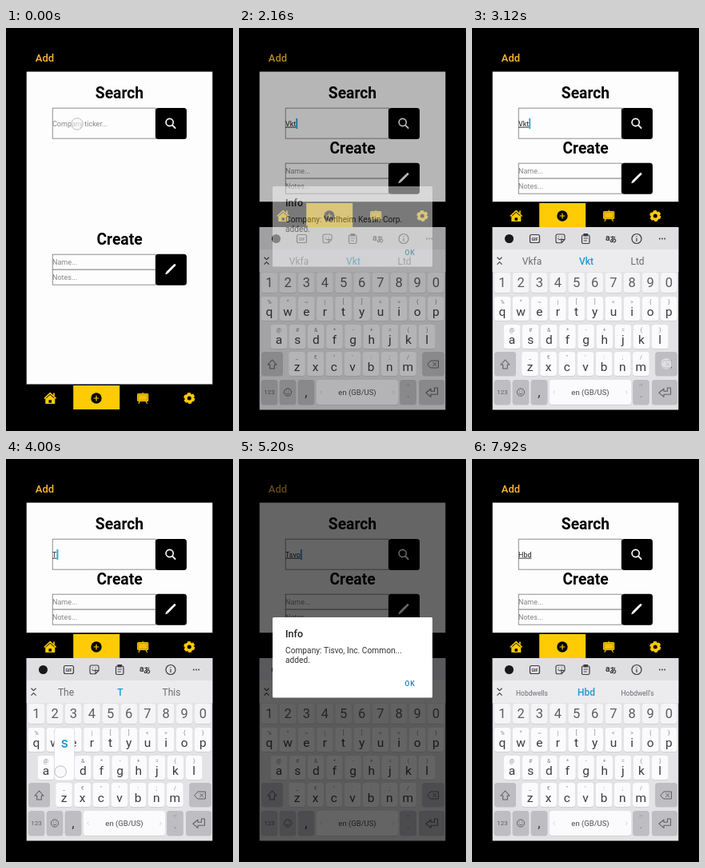
Recreate the animation shown at these times as an HTML page. Size 284x504 px, loop 8000 ms.

```html
<!DOCTYPE html>
<html lang="en">
<head>
<meta charset="utf-8">
<title>Add a company</title>
<style>
html, body { margin: 0; width: 100%; height: 100%; overflow: hidden; background: #000; }
svg { display: block; width: 284px; height: 504px; font-family: Roboto, sans-serif; }
text { white-space: pre; }
</style>
</head>
<body>
<svg id="stage" viewBox="0 0 284 504"></svg>
<script>
const LOOP = 8000;
const YELLOW = '#ffcb05', BLUE = '#1c9ad2', INK = '#3a3c40';

function el(parent, tag, attrs = {}, text) {
  const node = document.createElementNS('http://www.w3.org/2000/svg', tag);
  for (const k in attrs) node.setAttribute(k, attrs[k]);
  if (text !== undefined) node.textContent = text;
  parent.appendChild(node);
  return node;
}
const group = (parent, attrs) => el(parent, 'g', attrs);
const rect = (parent, x, y, width, height, fill, attrs) =>
  el(parent, 'rect', { x, y, width, height, fill, ...attrs });
const label = (parent, x, y, size, fill, text, attrs) =>
  el(parent, 'text', { x, y, 'font-size': size, fill, ...attrs }, text);
const centered = (parent, x, y, size, fill, text, attrs) =>
  label(parent, x, y, size, fill, text, { 'text-anchor': 'middle', ...attrs });
const line = (parent, d, stroke, width = 1, attrs) =>
  el(parent, 'path', { d, stroke, fill: 'none', 'stroke-width': width, 'stroke-linecap': 'round', 'stroke-linejoin': 'round', ...attrs });
const circle = (parent, cx, cy, r, fill, attrs) => el(parent, 'circle', { cx, cy, r, fill, ...attrs });
const show = (node, on) => node.setAttribute('visibility', on ? 'visible' : 'hidden');
const shift = (node, y) => node.setAttribute('transform', `translate(0 ${y})`);
const ramp = (t, from, to) => Math.min(1, Math.max(0, (t - from) / (to - from)));

const stage = document.getElementById('stage');
rect(stage, 0, 0, 284, 504, '#000');
rect(el(stage, 'clipPath', { id: 'screen' }), 25.7, 32, 232.6, 445.6, '#000');
const screen = group(stage, { 'clip-path': 'url(#screen)' });

// Page
label(screen, 36.8, 41.7, 13, '#fdb92e', 'Add', { 'font-weight': 500 });
const page = rect(screen, 25, 54.6, 234, 391.6, '#fdfdfd');

function field(parent, y, h, hint) {
  rect(parent, 58.3, y + .2, 129, h, '#fdfdfd', { stroke: '#8f8f8f' });
  return label(parent, 58, y + h / 2 + 3.6, 9, '#858585', hint);
}
function button(parent, y) {
  rect(parent, 187, y, 39, 39, '#000', { rx: 3.5 });
}
const bold = { 'font-weight': 700 };
centered(screen, 142, 88.2, 19.3, '#000', 'Search', bold);
const hint = field(screen, 100, 38, 'Company ticker...');
button(screen, 100);
circle(screen, 204.7, 118, 4.6, 'none', { stroke: '#fff', 'stroke-width': 1.6 });
line(screen, 'M208.2 121.6L211.6 125', '#fff', 1.8);
const typed = label(screen, 58, 122.7, 9, '#222', '', { 'text-decoration': 'underline' });
const caret = rect(screen, 58, 113, 2, 13, '#35a9d6');

const create = group(screen);
centered(create, 142, 271, 19.3, '#000', 'Create', bold);
field(create, 283, 19, 'Name...');
field(create, 302, 19, 'Notes...');
button(create, 282.7);
line(create, 'M201.5 306L209.4 298.1', '#fff', 2.8, { 'stroke-linecap': 'butt' });
line(create, 'M210.1 297.4L211 296.5', '#fff', 2.8);
el(create, 'path', { d: 'M200.3 305L202.6 307.3L199.3 308.3Z', fill: '#fff' });

// Tab bar
const nav = group(screen);
rect(nav, 25, -1.5, 234, 32, '#000');
rect(nav, 84.2, 0, 58, 30, YELLOW);
line(nav, 'M50 16.2V22.4H60.6V16.2', YELLOW, 1.4);
el(nav, 'path', { d: 'M50 16.5V22.5H53.5V18.3H57V22.5H60.5V16.5L55.2 11.8Z', fill: YELLOW });
line(nav, 'M48.3 16L55.2 9.6L62.2 16M60 10V13', YELLOW, 1.6);
circle(nav, 113, 16, 6.7, '#000');
line(nav, 'M113 13V19M110 16H116', YELLOW, 1.2);
rect(nav, 164.6, 10.6, 13.2, 9, '#c99f05', { stroke: YELLOW, rx: .6 });
rect(nav, 166.3, 12.2, 9.8, 5.8, '#f2c005');
line(nav, 'M171.2 9V10M167.3 20L166 22.6M175.1 20L176.4 22.6', YELLOW, 1.1);
circle(nav, 229.3, 16, 5.6, 'none', { stroke: YELLOW, 'stroke-width': 3, 'stroke-dasharray': '3.6 2.264' });
circle(nav, 229.3, 16, 4.2, 'none', { stroke: YELLOW, 'stroke-width': 3.4 });

// Keyboard
const board = group(screen);
rect(board, 25, 249, 234, 230, '#e3e2e5');
rect(board, 25, 249, 234, 28, '#dfdee1');
rect(board, 25, 277, 234, 28, '#ecebee');
circle(board, 46.5, 263.5, 5.5, '#16181b');
const tools = group(board, { fill: 'none', stroke: INK, 'stroke-width': 1.2, 'stroke-linecap': 'round', 'stroke-linejoin': 'round' });
rect(tools, 72.5, 258.5, 12, 10, 'none', { rx: 2 });
centered(board, 78.5, 265.7, 5.2, INK, 'GIF', bold);
line(tools, 'M107 258H114Q116 258 116 260V264.5L112 268.7H107Q105 268.7 105 266.7V260Q105 258 107 258ZM116 264.5H112V268.7M107.8 263.5Q110 266 112.2 263.5M108.3 261V261.1M112.3 261V261.1', INK, 1.1);
rect(tools, 137.5, 259, 9.5, 10.5, 'none', { rx: 1.5 });
rect(tools, 140, 257.5, 4.5, 2.5, INK);
line(tools, 'M140 263H144.5M140 266H143.5', INK, .9);
label(board, 167, 266, 10.5, INK, 'a', { 'font-weight': 700 });
label(board, 172, 268, 9, INK, 'あ', { 'font-family': '"Noto Sans CJK JP", "Noto Sans CJK", sans-serif', 'font-weight': 700 });
circle(tools, 206, 263.5, 6, 'none');
line(tools, 'M206 263V266.5M206 260.6V260.7', INK, 1.2);
for (const x of [234.8, 238, 241.2]) circle(board, x, 263.5, .9, INK);
line(board, 'M31.8 287L34.5 289.6L37.2 287M31.8 295.3L34.5 292.7L37.2 295.3', INK, 1.1);

const words = [75, 143, 207].map((x, i) =>
  centered(board, x, 295.5, 12, i === 1 ? BLUE : '#6b6d71', '', i === 1 ? { 'font-weight': 500 } : {}));

function keycap(x, y, w, h, fill = '#fbfafd') {
  rect(board, x - w / 2, y + .8, w, h, '#cbcace', { rx: 3.5 });
  rect(board, x - w / 2, y, w, h, fill, { rx: 3.5 });
}
const GREY = '#bebdc1', ICON = '#606166';
const keys = {};
[...'1234567890'].forEach((c, i) => {
  const x = 38 + i * 23.15;
  keycap(x, 306, 20.6, 25, '#f5f4f7');
  centered(board, x, 324.2, 16.5, '#5b5d61', c);
});
const rows = [
  ['qwertyuiop', '%^~|[]<>{}', 38, 336],
  ['asdfghjkl', '@#&*-+=()', 50, 371],
  ['zxcvbnm', '_€"\':;/', 72.5, 405]
];
for (const [letters, marks, x0, y] of rows) {
  [...letters].forEach((c, i) => {
    const x = x0 + i * 23.15;
    keycap(x, y, 20.6, 30);
    centered(board, x, y + 8.5, 7, '#85878b', marks[i]);
    keys[c] = { x, y, cap: centered(board, x, y + 23.6, 15.5, INK, c) };
  });
}
keycap(41.5, 405, 27, 30, GREY);
const shiftIcon = line(board, 'M41.5 415L47 421H44.3V426H38.7V421H36Z', ICON, 1.1);
keycap(243, 405, 27.5, 30, GREY);
line(board, 'M236 420.5L240 416H249.5V425H240ZM242.8 418.5L246.8 422.5M246.8 418.5L242.8 422.5', ICON, 1);
keycap(38, 440, 20.6, 31, GREY);
centered(board, 38, 458.3, 8, ICON, '123');
keycap(61, 440, 20.6, 31, GREY);
circle(board, 61, 455.5, 4.6, 'none', { stroke: ICON });
line(board, 'M58.8 456.8Q61 459.2 63.2 456.8M59.4 453.8V454M62.6 453.8V454', ICON, .9);
keycap(84, 440, 20.6, 31, GREY);
centered(board, 84, 461, 17, INK, ',');
keycap(148, 440, 102, 31);
centered(board, 148, 458.7, 9.5, '#4b4d51', 'en (GB/US)');
line(board, 'M103.5 453.7L101.7 455.5L103.5 457.3M192.5 453.7L194.3 455.5L192.5 457.3', '#d2d3d6', 1);
keycap(211.5, 440, 20.6, 31, GREY);
centered(board, 211.5, 448.5, 6, '#96979b', '!?');
centered(board, 211.5, 462, 14, '#808186', '.');
keycap(241, 440, 32, 31, GREY);
line(board, 'M248.5 450V458.2H240V461.3L233.8 456.2L240 451.2V454.2H244.5V450Z', ICON, 1.1);

const popup = group(screen);
const popupBox = rect(popup, 0, 0, 25, 66, '#fdfdfe', { rx: 4, stroke: '#d3d2d6', 'stroke-width': .6 });
const popupText = centered(popup, 0, 0, 17.5, BLUE, '', { 'font-weight': 500 });

// Dialog
const dim = rect(stage, 0, 0, 284, 504, '#000');
const dialog = group(stage);
rect(dialog, 42, 198, 200, 100.5, '#fff', { rx: 1.5 });
label(dialog, 58, 222.7, 12.5, '#222', 'Info', { 'font-weight': 500 });
const message = label(dialog, 58, 243, 10.2, '#333', '');
label(dialog, 58, 255, 10.2, '#333', 'added.');
label(dialog, 207.5, 284, 8.6, '#1a7fae', 'OK', { 'font-weight': 500, 'letter-spacing': .7 });

const touch = circle(stage, 0, 0, 7.3, '#f6f6fa', { 'fill-opacity': .6, stroke: '#bdbcc6', 'stroke-width': 1 });

// Script of taps: time, target
const spots = { field: [89, 120], go: [206, 120], ok: [221, 282], del: [243, 420] };
const taps = [
  [-40, 'field'],
  [660, 'v'], [840, 'k'], [1020, 't'], [1420, 'go'], [2480, 'ok'],
  [3080, 'del'], [3280, 'del'], [3500, 'del'],
  [3760, 't'], [3980, 's'], [4160, 'v'], [4330, 'o'], [4560, 'go'], [5440, 'ok'],
  [6480, 'del'], [6600, 'del'], [6720, 'del'], [6840, 'del'],
  [6990, 'h'], [7160, 'b'], [7330, 'd']
];
const dialogs = [
  [2090, 2560, 'Company: Vorlheim Kestin Corp.'],
  [4880, 5640, 'Company: Tisvo, Inc. Common...']
];
const guesses = {
  '': ['I', 'The', 'This'],
  V: ['Very', 'V', 'Via'], Vk: ['Vkf', 'Vk', 'Ok'], Vkt: ['Vkfa', 'Vkt', 'Ltd'],
  T: ['The', 'T', 'This'], Ts: ['Tsk', 'Ts', 'Its'], Tsv: ['Tsv', 'Tsvo', 'Tai'], Tsvo: ['Tsvo', 'Tisvo', 'Tällä'],
  H: ['Hi', 'H', 'How'], Hb: ['Hb', 'Hub', 'He'], Hbd: ['Hobdwells', 'Hbd', "Hobdwell's"]
};
const PRESS = 85;

function textAt(t) {
  let text = '', edited = 0;
  for (const [at, key] of taps) {
    if (t < at + PRESS) break;
    if (key === 'del') text = text.slice(0, -1);
    else if (keys[key]) text += text ? key : key.toUpperCase();
    edited = at + PRESS;
  }
  return { text, edited };
}

function drawTouch(t, caps) {
  show(touch, false);
  show(popup, false);
  for (const [at, name] of taps) {
    const life = name === 'ok' ? 240 : 180, age = t - at;
    if (age < 0 || age >= life) continue;
    const key = keys[name];
    const [x, y] = key ? [key.x - (name === 's' ? 5 : 0), key.y + 20] : spots[name];
    show(touch, true);
    touch.setAttribute('cx', x);
    touch.setAttribute('cy', y);
    touch.setAttribute('opacity', 1 - .6 * ramp(age, life * .5, life));
    if (key && age < PRESS) {
      show(popup, true);
      popupBox.setAttribute('x', key.x - 12.5);
      popupBox.setAttribute('y', key.y - 35);
      popupText.setAttribute('x', key.x);
      popupText.setAttribute('y', key.y - 10);
      popupText.textContent = caps ? name.toUpperCase() : name;
    }
  }
}

function drawDialog(t) {
  let box = 0, shade = 0;
  for (const [open, close, text] of dialogs) {
    if (t < open || t > close + 340) continue;
    box = ramp(t, open, open + 150) * (1 - ramp(t, close, close + 145));
    shade = .6 * ramp(t, open, open + 150) * (1 - ramp(t, close, close + 340));
    message.textContent = text;
  }
  dialog.setAttribute('opacity', box);
  dim.setAttribute('opacity', shade);
  return box > 0;
}

function render(t) {
  const { text, edited } = textAt(t);
  const caps = !text;
  const rise = 1 - (1 - ramp(t, 240, 460)) ** 2;
  const compact = t >= 400;

  page.setAttribute('height', compact ? 162.9 : 391.6);
  shift(create, compact ? -114 : 0);
  shift(nav, compact ? 219 : 447);
  shift(board, 229 * (1 - rise));

  typed.textContent = text;
  show(hint, caps);
  guesses[text].forEach((word, i) => {
    words[i].textContent = word;
    words[i].setAttribute('font-size', word.length > 8 ? 8.5 : 12);
  });
  for (const c in keys) keys[c].cap.textContent = caps ? c.toUpperCase() : c;
  shiftIcon.setAttribute('fill', caps ? ICON : 'none');

  const modal = drawDialog(t);
  const closed = dialogs.reduce((last, d) => t > d[1] + 340 ? d[1] + 340 : last, 0);
  const idle = t - Math.max(edited, closed);
  caret.setAttribute('x', 58 + (text ? typed.getComputedTextLength() : 0));
  show(caret, t > 120 && (modal || idle % 1000 < 500));
  drawTouch(t, caps);
}

const start = performance.now();
function tick() {
  render((performance.now() - start) % LOOP);
  requestAnimationFrame(tick);
}
tick();
</script>
</body>
</html>
```
